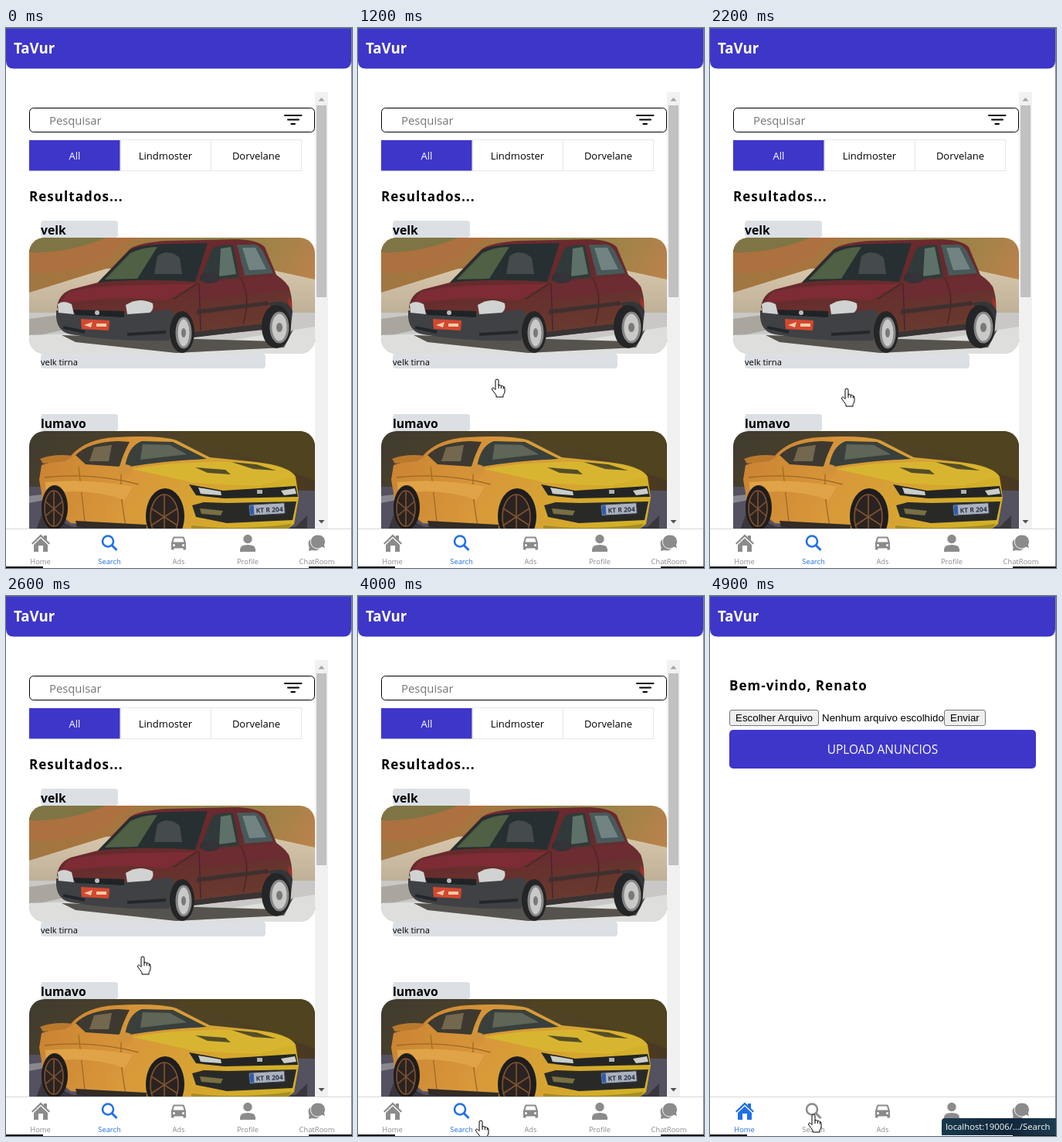
An HTML page that plays this animation: 448x698 px, repeating every 5000 ms.

```html
<!DOCTYPE html>
<html lang="pt">
<head>
<meta charset="utf-8">
<title>Busca de carros</title>
<style>
  html, body { margin: 0; width: 100%; height: 100%; overflow: hidden; background: #fff; }
  svg { display: block; width: 100vw; height: 100vh; }
  text { font-family: "Open Sans", "Noto Sans", sans-serif; white-space: pre; }
  .bold { font-weight: 700; }
  .mid { text-anchor: middle; }
  .head { font-size: 17px; font-weight: 700; letter-spacing: 1.05px; }
  .name { font-size: 15.7px; font-weight: 700; }
  .form { font-family: "Liberation Sans", Arial, sans-serif; font-size: 13.33px; }
  .chip { font-size: 13px; text-anchor: middle; }
  .tab { --c: #8b8b8c; fill: var(--c); stroke: none; }
  .tab.on { --c: #2070e6; }
  .tab text { font-size: 9.4px; text-anchor: middle; }
  .line { fill: none; stroke: var(--c); }
</style>
</head>
<body>
<svg viewBox="0 0 448 698" preserveAspectRatio="none">
  <defs>
    <clipPath id="photo1"><rect x="30" y="271" width="370" height="150" rx="20"/></clipPath>
    <clipPath id="photo2"><rect x="30" y="521" width="370" height="150" rx="20"/></clipPath>
    <linearGradient id="slope" x2="1" y2=".25">
      <stop stop-color="#9b7843"/><stop offset=".3" stop-color="#a9743e"/>
      <stop offset=".65" stop-color="#8c8246"/><stop offset="1" stop-color="#b9824b"/>
    </linearGradient>
    <linearGradient id="wall" x2="0" y2="1">
      <stop stop-color="#d6c6ab"/><stop offset="1" stop-color="#b9ab94"/>
    </linearGradient>
    <linearGradient id="wine" x2=".35" y2="1">
      <stop stop-color="#702a31"/><stop offset=".5" stop-color="#662a2c"/><stop offset="1" stop-color="#68392f"/>
    </linearGradient>
    <linearGradient id="field" x2="1" y2=".5">
      <stop stop-color="#3f3b30"/><stop offset=".55" stop-color="#514425"/><stop offset="1" stop-color="#4a3822"/>
    </linearGradient>
    <linearGradient id="gold" x2="1" y2=".2">
      <stop stop-color="#c98132"/><stop offset=".45" stop-color="#d9983a"/><stop offset="1" stop-color="#d3b027"/>
    </linearGradient>
    <linearGradient id="bubble" x2="1">
      <stop stop-color="#18384c"/><stop offset=".6" stop-color="#10263a"/><stop offset="1" stop-color="#1c3c50"/>
    </linearGradient>
  </defs>

  <rect width="448" height="698" fill="#fff"/>
  <rect x="447" width="1" height="698" fill="#7d8794"/>
  <path d="M0 0H447V42.500Q447 52.500 437 52.500H10Q0 52.500 0 42.500Z" fill="#3e36c9"/>
  <rect width="448" height="1" fill="#44659c"/>
  <text class="bold" x="10" y="33" font-size="18.7" fill="#fff">TaVur</text>

  <g id="search">
    <rect x="400" y="83" width="17" height="564" fill="#f1f1f1"/>
    <rect x="402" y="100" width="13" height="248" fill="#c1c1c1"/>
    <path d="M404.500 94.500L408.500 90L412.500 94.500Z" fill="#a3a3a3"/>
    <path d="M404.500 636L408.500 640.500L412.500 636Z" fill="#505050"/>

    <rect x="30.500" y="103.500" width="369" height="31" rx="5" fill="#fff" stroke="#000"/>
    <text x="56" y="125" font-size="14.8" fill="#757575">Pesquisar</text>
    <path d="M361 113H382.500M365 118.500H379M369.500 124H374" stroke="#000" stroke-width="2" stroke-linecap="round"/>

    <rect x="30" y="145" width="117.500" height="39.500" fill="#3e36c9"/>
    <g fill="#fff" stroke="#e4e7ea">
      <rect x="148.500" y="144.500" width="117" height="40"/>
      <rect x="265.500" y="144.500" width="117" height="40"/>
    </g>
    <text class="chip" x="89" y="170" fill="#fff">All</text>
    <text class="chip" x="206.500" y="170">Lindmoster</text>
    <text class="chip" x="324" y="170">Dorvelane</text>
    <text class="head" x="30" y="224">Resultados...</text>

    <g fill="#dcdfe4">
      <rect x="45" y="249" width="100" height="22" rx="4"/>
      <rect x="45" y="421" width="291" height="19" rx="4"/>
      <rect x="45" y="499" width="100" height="22" rx="4"/>
    </g>
    <text class="name" x="45" y="267">velk</text>
    <text x="45" y="436" font-size="11.2">velk tirna</text>
    <text class="name" x="45" y="517">lumavo</text>

    <!-- Red hatchback -->
    <g clip-path="url(#photo1)">
      <rect x="30" y="271" width="370" height="150" fill="url(#slope)"/>
      <path d="M30 271H165L120 302Q80 318 30 316Z" fill="#ad7040"/>
      <path d="M30 271H130Q80 292 30 290Z" fill="#7f7544"/>
      <path d="M30 342L130 311L340 312L400 325V380H30Z" fill="url(#wall)"/>
      <path d="M30 368H400V421H30Z" fill="#c9c8c6"/>
      <path d="M30 376L75 370V390L30 400Z" fill="#aaa69f"/>
      <path d="M30 397L90 395L230 413L400 386V421H30Z" fill="#dededc"/>
      <path d="M72 397L212 401L350 405L372 390L360 413L220 420L90 406Z" fill="#56534f"/>
      <path d="M66 361Q68 344 84 338L119 329L160 286Q172 277 210 275L300 273Q326 274 335 283L350 319L366 334Q372 350 370 372L366 387L245 399L205 402L82 394Z" fill="url(#wine)"/>
      <path d="M119 329L160 287Q168 281 210 279L261 278L245 328Q180 323 119 329Z" fill="#262f31"/>
      <path d="M128 325L161 291Q178 283 196 283L170 324Z" fill="#506044"/>
      <path d="M196 295Q210 284 225 297L228 318H192Z" fill="#454b4c"/>
      <path d="M251 326L267 286Q270 280 294 280L302 323Z" fill="#303a3a"/>
      <path d="M278 285L291 283L298 318L276 321Z" fill="#5e7168"/>
      <path d="M299 280L322 280Q329 282 333 289L346 317L309 320Z" fill="#48595a"/>
      <path d="M306 284L323 284L337 312L315 313Z" fill="#718482"/>
      <path d="M78 343Q100 331 245 331L207 352Q145 345 72 356Z" fill="#7d2b34"/>
      <path d="M248 330L351 320Q364 328 367 338L248 350Z" fill="#6c2c32"/>
      <path d="M250 330L252 391M304 323Q318 349 307 382M218 350L248 330" fill="none" stroke="#48242a" stroke-width="1.5"/>
      <path d="M247 364L340 353V358L247 370Z" fill="#3f3030"/>
      <path d="M243 393L336 382V389L243 400Z" fill="#393434"/>
      <path d="M65 365L150 370L214 364Q222 371 218 384L211 404Q142 406 84 396Q67 393 65 374Z" fill="#3f4144"/>
      <path d="M87 364L153 366V374L90 371Z" fill="#202326"/>
      <path d="M67 357Q74 351 85 357L88 370L68 368Z" fill="#d0d3d2"/>
      <path d="M155 358Q172 347 190 356Q192 364 186 368L157 370Z" fill="#d0d3d2"/>
      <circle cx="118" cy="368" r="3" fill="#b9babb"/>
      <path d="M97 376L134 378L133 391L98 389Z" fill="#d5482f"/>
      <path d="M101 384L112 380L110 387ZM117 382H130V386H117Z" fill="#f0c8aa"/>
      <path d="M74 387L102 393M157 396L207 393" stroke="#24272a" stroke-width="4"/>
      <path d="M366 348L370 354V371L365 367Z" fill="#a52c2d"/>
      <path d="M340 356Q364 348 371 366L369 385L359 379Z" fill="#34373a"/>
      <ellipse cx="264" cy="323" rx="13" ry="7" fill="#333338"/>
      <g fill="#242526">
        <ellipse cx="228" cy="393" rx="16" ry="27"/>
        <ellipse cx="350" cy="386" rx="19" ry="28"/>
      </g>
      <g fill="#c9c9c7" stroke="#858686" stroke-width="3">
        <ellipse cx="230" cy="394" rx="9" ry="19"/>
        <ellipse cx="354" cy="387" rx="11" ry="19"/>
      </g>
      <g fill="#777a79">
        <ellipse cx="230" cy="394" rx="3" ry="6"/>
        <ellipse cx="354" cy="387" rx="4" ry="6"/>
      </g>
    </g>

    <!-- Yellow coupe -->
    <g clip-path="url(#photo2)">
      <rect x="30" y="521" width="370" height="150" fill="url(#field)"/>
      <path d="M215 521H400V585L330 560Z" fill="#50431f"/>
      <path d="M30 593L400 598V671H30Z" fill="#545160"/>
      <path d="M30 605L55 602V609L30 614Z" fill="#8b8790"/>
      <path d="M48 625L86 645L375 645L390 630V671H30Z" fill="#3a363c"/>
      <path d="M46 565L84 553Q103 531 142 529Q198 526 221 533L264 555L324 561Q367 566 375 580L379 607L373 641L350 660H225L180 648L84 640L48 612L43 584Z" fill="url(#gold)"/>
      <path d="M44 557Q61 550 87 553L77 560L48 563Z" fill="#b9792d"/>
      <path d="M90 552Q108 535 145 534L160 535Q151 552 147 567L103 564Z" fill="#3d3930"/>
      <path d="M114 542L137 539L133 560L108 560Z" fill="#73674e"/>
      <path d="M154 568Q158 540 176 534L216 535L260 557Q205 559 154 568Z" fill="#39403c"/>
      <path d="M177 538L212 539L234 551L174 558Z" fill="#5f6658"/>
      <path d="M163 570Q230 558 319 562Q365 566 374 580L325 592L244 588Z" fill="#d8b530"/>
      <path d="M245 568L284 571L291 577L261 575ZM292 561L324 564L350 572L320 570Z" fill="#564d27"/>
      <path d="M94 567L102 638M150 569Q146 597 155 643M50 581Q112 574 172 590" fill="none" stroke="#9b6b27" stroke-width="1.3"/>
      <path d="M51 587Q111 582 164 593L154 610Q103 593 52 602Z" fill="#e0a347"/>
      <path d="M90 637L182 642V650L92 645Z" fill="#322b27"/>
      <path d="M237 590L281 598L375 592L378 606L282 608L246 604Z" fill="#232524"/>
      <path d="M249 594L278 599L279 604L252 602Z" fill="#c9cec8"/>
      <path d="M356 598L374 595L376 602L360 604Z" fill="#c9cec8"/>
      <path d="M241 617L256 613L286 614L376 612L371 636L286 640L246 632Z" fill="#292a28"/>
      <path d="M251 621L281 624L278 630L253 628Z" fill="#777043"/>
      <path d="M240 643Q300 650 370 641L357 658H240Z" fill="#a68d24"/>
      <rect x="325" y="597" width="7" height="5" fill="#aeb0ac"/>
      <g transform="rotate(-3 338 622)">
        <rect x="315" y="615" width="46" height="14" rx="1" fill="#aab2bf" stroke="#333944"/>
        <rect x="316" y="616" width="5" height="12" fill="#315da9"/>
        <text class="bold mid" x="341" y="626" font-size="8.5" fill="#2b3240">KT R 204</text>
      </g>
      <ellipse cx="154" cy="571" rx="10" ry="7" fill="#d0933a"/>
      <g fill="#1f1c1d">
        <ellipse cx="63" cy="620" rx="17" ry="29"/>
        <ellipse cx="206" cy="631" rx="25" ry="36"/>
      </g>
      <g fill="#2b2321" stroke="#80532f" stroke-width="1.6">
        <ellipse cx="62" cy="621" rx="12" ry="23"/>
        <ellipse cx="205" cy="632" rx="18" ry="29"/>
        <path d="M62 598V644M51 612L73 631M51 631L73 612M205 603V661M188 621L222 643M188 643L222 621"/>
      </g>
    </g>
  </g>

  <g id="home">
    <text class="head" x="25" y="122">Bem-vindo, Renato</text>
    <g fill="#efefef" stroke="#767676">
      <rect x="25.500" y="147.500" width="115" height="20" rx="2.5"/>
      <rect x="303.500" y="147.500" width="53" height="20" rx="2.5"/>
    </g>
    <text class="form" x="33" y="162">Escolher Arquivo</text>
    <text class="form" x="145" y="162">Nenhum arquivo escolhido</text>
    <text class="form" x="311" y="162">Enviar</text>
    <rect x="25" y="173" width="397" height="50" rx="5" fill="#3e36c9"/>
    <text class="mid" x="223.500" y="204" font-size="15.4" fill="#fff">UPLOAD ANUNCIOS</text>
  </g>

  <rect y="647" width="447" height="51" fill="#fff"/>
  <rect y="647" width="447" height="1" fill="#d8d8d8"/>
  <path d="M0 696H48V698H0ZM392 696H448V698H392Z" fill="#171717"/>
  <g class="tab" id="homeTab">
    <path d="M33 666L45 654.500L49 658.300V656H53V662.300L57 666L55.500 667.500L45 657.700L34.500 667.500Z"/>
    <path d="M36 668L45 659.500L54 668V677H48V669H42V677H36Z"/>
    <text x="44.500" y="693">Home</text>
  </g>
  <g class="tab" id="searchTab">
    <circle class="line" cx="132" cy="663.500" r="7" stroke-width="2.6"/>
    <path class="line" d="M137 668.500L143.500 675" stroke-width="3"/>
    <text x="134" y="693">Search</text>
  </g>
  <g class="tab">
    <path d="M217.500 657.500H229.500Q230.500 657.500 231 659L233 665.500V674.500H229.500V672.500H217.500V674.500H214V665.500L216 659Q216.500 657.500 217.500 657.500Z"/>
    <path d="M218 659.500H229L230.500 664.500H216.500Z" fill="#fff"/>
    <circle cx="217.500" cy="668.500" r="1.500" fill="#fff"/><circle cx="229.500" cy="668.500" r="1.500" fill="#fff"/>
    <text x="223.500" y="693">Ads</text>
  </g>
  <g class="tab">
    <circle cx="313" cy="660.500" r="5.700"/>
    <path d="M303 677V674Q303 668 313 668T323 674V677Z"/>
    <text x="313" y="693">Profile</text>
  </g>
  <g class="tab">
    <path d="M392 676L392.500 671Q389 661 398 660Q407 661 407 669T396 675Z"/>
    <path d="M404 655A9 9 0 1 0 409 671L413.500 673L412.500 668A9 9 0 0 0 404 655Z" stroke="#fff"/>
    <text x="402.500" y="693">ChatRoom</text>
  </g>

  <g id="status">
    <path d="M300 697V679Q300 675 304 675H448V697Z" fill="url(#bubble)"/>
    <text id="link" x="305" y="690" font-size="11.3" fill="#fff"></text>
  </g>

  <g id="hand" fill="#fff" stroke="#000" stroke-linejoin="round">
    <path d="M-2 2Q-2 0 0 0T2 2V8Q4 6.800 5.300 8.600Q7.300 7.600 8.200 9.600Q10 9 10 12V16Q10 18 8 20.500V23H-1V20.500L-6 14Q-7.500 11.500 -5.500 11Q-4 11 -2 13.500Z"/>
    <path d="M2 7V12M5.300 8.500V12M8.200 9.500V12.500" fill="none"/>
  </g>
</svg>
<script>
  const LOOP = 5000, STEP = 100;
  const ENTER = 200, STATUS = 4200, HOME = 4600;
  const TAB_EDGE = 89.5;
  // Pointer stops: time, x, y
  const stops = [
    [200, 146, 690], [600, 162, 281], [1200, 180, 454], [1400, 177, 466],
    [3600, 177, 466], [4000, 159, 678], [4400, 46, 668], [4600, 46, 668], [4900, 134, 670]
  ];
  const get = id => document.getElementById(id);
  const show = (id, on) => get(id).setAttribute("visibility", on ? "visible" : "hidden");
  const ease = p => p * p * (3 - 2 * p);

  function pointerAt(t) {
    const next = stops.findIndex(s => s[0] > t);
    if (next < 0) return stops[stops.length - 1].slice(1);
    if (next === 0) return stops[0].slice(1);
    const a = stops[next - 1], b = stops[next];
    const p = ease((t - a[0]) / (b[0] - a[0]));
    return [1, 2].map(i => a[i] + (b[i] - a[i]) * p);
  }

  function draw(ms) {
    const t = Math.floor((ms % LOOP) / STEP) * STEP;
    const atHome = t >= HOME;
    const [x, y] = pointerAt(t).map(Math.round);
    show("search", !atHome);
    show("home", atHome);
    show("status", t >= STATUS);
    show("hand", t >= ENTER);
    get("homeTab").classList.toggle("on", atHome);
    get("searchTab").classList.toggle("on", !atHome);
    get("link").textContent = "localhost:19006/.../" + (x < TAB_EDGE ? "Home" : "Search");
    get("hand").setAttribute("transform", `translate(${x} ${y})`);
  }

  const start = performance.now();
  function tick() {
    draw(performance.now() - start);
    requestAnimationFrame(tick);
  }
  tick();
</script>
</body>
</html>
```
